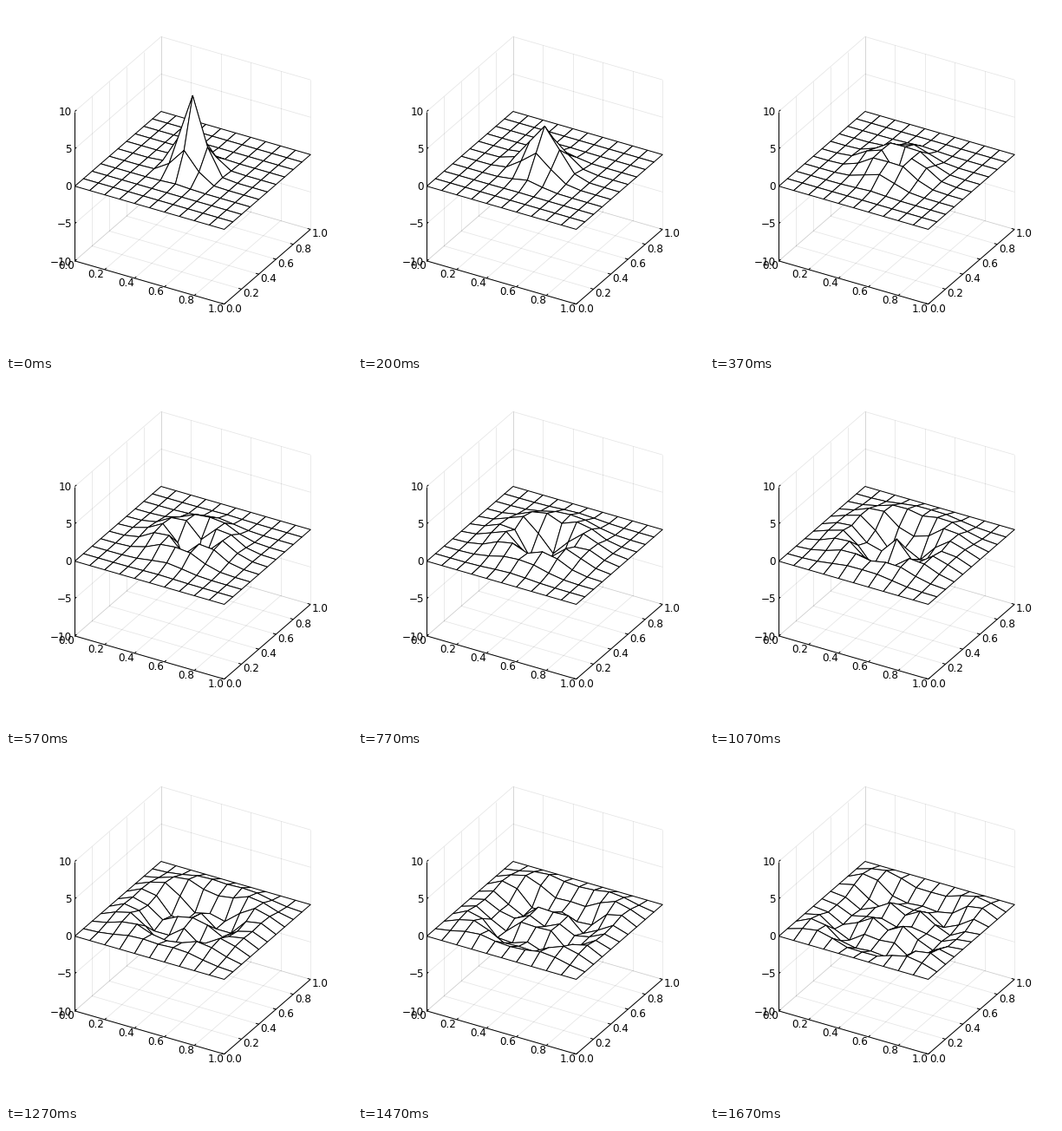
These frames come from a looping animation (399x400 px, 1710 ms). A matplotlib script:

```python
import numpy as np
import matplotlib.pyplot as plt
from matplotlib.animation import FuncAnimation
from matplotlib.collections import LineCollection, PolyCollection

W, H, DPI = 399, 400, 100
PX = 72 / DPI                     # one pixel in points
N, STEPS, COURANT = 11, 51, 0.1
TICK_MS, LOOP_MS = 10, 1710
CX, CY, SIZE = 215.25, 189.5, 199.0
COS, SIN = np.cos(np.pi / 6), np.sin(np.pi / 6)


def project(x, y, z):
    """Orthographic view, 30 degrees azimuth and elevation; z spans -10..10."""
    x, y = np.asarray(x) - 0.5, np.asarray(y) - 0.5
    sx = CX + SIZE * (COS * x + SIN * y)
    sy = CY + SIZE * (SIN * (SIN * x - COS * y) - COS * np.asarray(z) / 20)
    return np.stack(np.broadcast_arrays(sx, sy), axis=-1)


def segment(a, b):
    return [project(*a), project(*b)]


def laplacian(u):
    out = np.zeros_like(u)
    out[1:-1, 1:-1] = (u[2:, 1:-1] + u[:-2, 1:-1] + u[1:-1, 2:]
                       + u[1:-1, :-2] - 4 * u[1:-1, 1:-1])
    return out


def simulate():
    """Wave equation with fixed edges, released at rest from a Gaussian."""
    k = COURANT ** 2
    u = 10 * np.exp(-100 * ((gx - 0.5) ** 2 + (gy - 0.5) ** 2))
    states = [u, u + k / 2 * laplacian(u)]
    while len(states) < STEPS:
        states.append(2 * states[-1] - states[-2] + k * laplacian(states[-1]))
    return states


def quads(u):
    """Mesh cells from back to front."""
    p = project(gx, gy, u)
    return [[p[i, j], p[i + 1, j], p[i + 1, j + 1], p[i, j + 1]]
            for j in reversed(range(N - 1)) for i in range(N - 1)]


side = np.linspace(0, 1, N)
gx, gy = np.meshgrid(side, side, indexing="ij")
waves = simulate()

fig = plt.figure(figsize=(W / DPI, H / DPI), dpi=DPI, facecolor="white")
ax = fig.add_axes([0, 0, 1, 1])
ax.set(xlim=(0, W), ylim=(H, 0))
ax.axis("off")

grid, axes = [], [
    segment((0, 0, -10), (1, 0, -10)),
    segment((1, 0, -10), (1, 1, -10)),
    segment((0, 0, -10), (0, 0, 10)),
]
TICK = 0.02


def label(pos, dx, dy, text, ha):
    ax.text(pos[0] + dx, pos[1] + dy + 4.4, text, ha=ha, va="baseline",
            family="DejaVu Sans", size=12 * PX, color="black")


for t in np.linspace(0, 1, 6):
    grid += [segment((t, 0, -10), (t, 1, -10)), segment((t, 1, -10), (t, 1, 10)),
             segment((0, t, -10), (1, t, -10)), segment((0, t, -10), (0, t, 10))]
    axes += [segment((t, 0, -10), (t, TICK, -10)),
             segment((1, t, -10), (1 - TICK, t, -10))]
    label(project(t, 0, -10), -0.2, 5, f"{t:.1f}", "right")
    label(project(1, t, -10), 1.8, 4.5, f"{t:.1f}", "left")

for z in range(-10, 11, 5):
    grid += [segment((0, 0, z), (0, 1, z)), segment((0, 1, z), (1, 1, z))]
    axes.append(segment((0, 0, z), (0, TICK, z)))
    label(project(0, 0, z), -3.4, 0.3, str(z).replace("-", "\u2212"), "right")

ax.add_collection(LineCollection(grid, colors=[(0, 0, 0, 0.1)],
                                 linewidths=0.8 * PX, zorder=1))
ax.add_collection(LineCollection(axes, colors="black", linewidths=PX, zorder=2))
mesh = PolyCollection(quads(waves[0]), facecolors="white", edgecolors="black",
                      linewidths=PX, joinstyle="round", zorder=3)
ax.add_collection(mesh)


def update(tick):
    # The wave advances 30 times a second on a 10 ms clock.
    step = min(STEPS - 1, int((tick + 0.5) * 0.3))
    mesh.set_verts(quads(waves[step]))
    return [mesh]


anim = FuncAnimation(fig, update, frames=LOOP_MS // TICK_MS, interval=TICK_MS,
                     repeat=True, repeat_delay=0)
plt.show()
```
